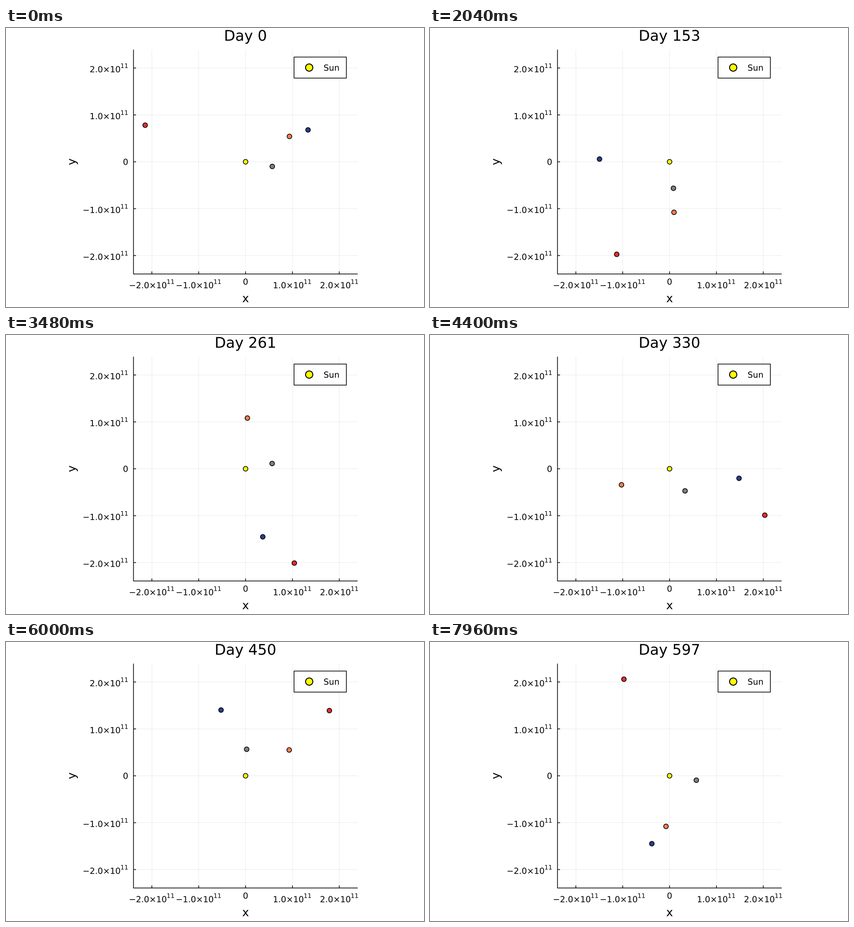
Recreate the animation shown at these times as a matplotlib script. Size 900x600 px, loop 8 s.

```python
import numpy as np
import matplotlib.pyplot as plt
from matplotlib.animation import FuncAnimation
from matplotlib.patches import Circle, PathPatch, Rectangle
from matplotlib.path import Path
from matplotlib.textpath import TextPath
from matplotlib.transforms import Affine2D

W, H, DPI = 900, 600, 100
FRAMES, INTERVAL, DAYS_PER_FRAME = 200, 40, 3
CX, CY, UNIT = 515.8, 287.7, 100.85      # sun position, pixels per 1e11 m
LEFT, RIGHT, TOP, BOTTOM = 274.5, 757.2, 46.5, 529.0
SMALL, MEDIUM, LARGE = 18.0, 24.7, 31.6  # text sizes in pixels

# colour, start angle, degrees per day, semi-major axis in px, eccentricity
# (every orbit starts at its farthest point)
PLANETS = [
    ("#808080", -9.87, 4.2219, 57.22, 0.0206),
    ("#ff7f50", 30.0, 1.6013, 109.1, 0.0),
    ("#27408b", 27.0, 0.9855, 150.95, 0.0),
    ("#ee2c2c", 160.0, 0.5276, 229.06, 0.0043),
]

plt.rcParams["font.family"] = "DejaVu Sans"
fig = plt.figure(figsize=(W / DPI, H / DPI), dpi=DPI, facecolor="white")
ax = fig.add_axes([0, 0, 1, 1])
ax.set(xlim=(0, W), ylim=(H, 0))
ax.axis("off")


def px(n):
    return n * 72 / DPI


def line(x, y, width=1.5, **kw):
    ax.plot(x, y, lw=px(width), snap=False, solid_capstyle="butt",
            **{"color": "black", **kw})


def disc(x, y, radius, color, stroke, z):
    return ax.add_patch(Circle((x, y), radius, fc=color, ec="black",
                               lw=px(stroke), zorder=z))


def glyphs(text, size):
    return TextPath((0, 0), text, size=size).transformed(Affine2D().scale(1, -1))


def moved(path, dx, dy):
    return path.transformed(Affine2D().translate(dx, dy))


def ink(path, z=6):
    return ax.add_patch(PathPatch(path, fc="black", lw=0, zorder=z))


def place(path, x, baseline, align):
    """Put the drawn extent of the text at x: 0 left, 0.5 centre, 1 right."""
    box = path.get_extents()
    return ink(moved(path, x - box.x0 - align * box.width, baseline))


def power_label(value):
    base = glyphs(f"{value:.1f}×10".replace("-", "−"), SMALL)
    power = glyphs("11", 13.3)
    gap = base.get_extents().x1 + 2.2 - power.get_extents().x0
    return Path.make_compound_path(base, moved(power, gap, -9.3))


def draw_axes():
    for v in range(-2, 3):
        x, y = CX + v * UNIT, CY - v * UNIT
        line([x, x], [TOP, BOTTOM], 0.9, alpha=0.09, zorder=1)
        line([LEFT, RIGHT], [y, y], 0.9, alpha=0.09, zorder=1)
        line([x, x], [BOTTOM, BOTTOM - 5.5], zorder=2)
        line([LEFT, LEFT + 5.5], [y, y], zorder=2)
        if v:
            place(power_label(v), x, 559.6, 0.5)
            place(power_label(v), 262, y + 9.2, 1)
        else:
            place(glyphs("0", SMALL), x, 552, 0.5)
            place(glyphs("0", SMALL), 262, y + 6.6, 1)
    line([LEFT, LEFT, RIGHT], [TOP, BOTTOM, BOTTOM], zorder=2)
    place(glyphs("x", MEDIUM), CX, 589.7, 0.5)
    up = glyphs("y", MEDIUM).transformed(Affine2D().rotate_deg(-90))
    box = up.get_extents()
    ink(moved(up, 145.3 - (box.x0 + box.x1) / 2, CY - (box.y0 + box.y1) / 2))


def draw_legend():
    ax.add_patch(Rectangle((620.2, 62.5), 112.6, 45.2, fc="white", ec="black",
                           lw=px(1.5), snap=False, zorder=5))
    disc(652.8, 85.1, 7.8, "yellow", 2, 6)
    place(glyphs("Sun", SMALL), 685, 91.8, 0)


def position(day, start, rate, a, e):
    mean = np.radians(180 + rate * day)
    ecc = mean
    for _ in range(5):
        ecc = mean + e * np.sin(ecc)
    x, y = a * (np.cos(ecc) - e), a * np.sqrt(1 - e * e) * np.sin(ecc)
    turn = np.radians(start - 180)
    return (CX + x * np.cos(turn) - y * np.sin(turn),
            CY - x * np.sin(turn) - y * np.cos(turn))


def title_path(day):
    text = f"Day {day}"
    advance = LARGE * (2.293 + 0.636 * (len(text) - 4))
    return moved(glyphs(text, LARGE), 515.6 - advance / 2, 27.4)


draw_axes()
draw_legend()
disc(CX, CY, 5, "yellow", 1.5, 3)
planets = [disc(0, 0, 5, p[0], 1.5, 4) for p in PLANETS]
title = ink(title_path(0))


def update(frame):
    day = frame * DAYS_PER_FRAME
    title.set_path(title_path(day))
    for dot, (_, *orbit) in zip(planets, PLANETS):
        dot.center = position(day, *orbit)
    return [title, *planets]


anim = FuncAnimation(fig, update, frames=FRAMES, interval=INTERVAL,
                     repeat=True, repeat_delay=0, blit=False)
plt.show()
```
